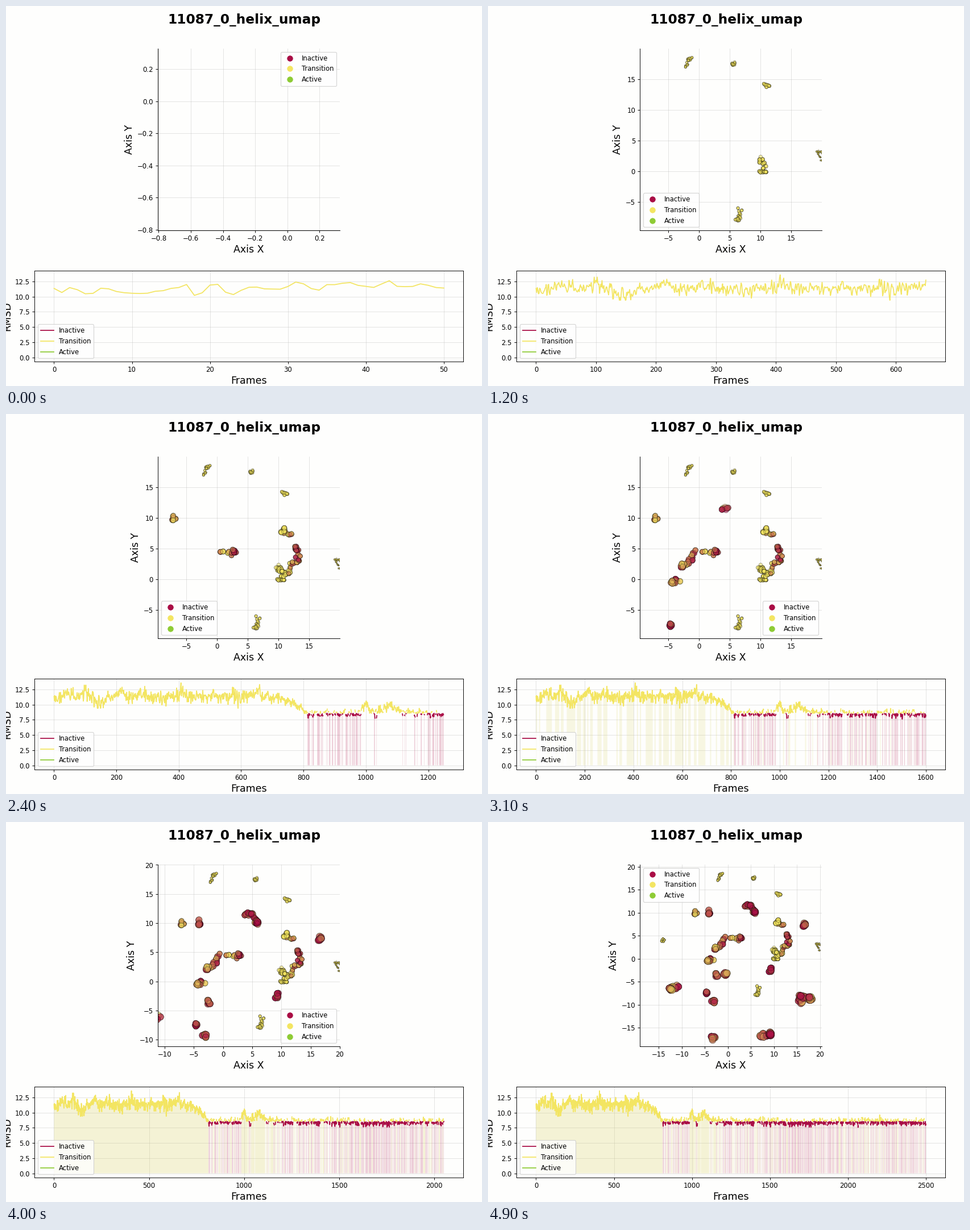
A matplotlib script for the animation above (5 s loop, 837x669 px).

```python
import numpy as np
import matplotlib.pyplot as plt
from matplotlib.animation import FuncAnimation
from matplotlib.lines import Line2D

DPI = 83.7
WIDTH, HEIGHT = 837, 669
STEP, FRAMES = 50, 50
TOTAL = STEP * FRAMES + 1
BACKGROUND = "#fefefd"
SHADE = "#d8d060"
STATES = {"Inactive": "#a90d45", "Transition": "#f3e562", "Active": "#8ecb35"}
rng = np.random.default_rng(11087)
index = np.arange(TOTAL)

# Stops of the walk through the projection, all with the same dwell time.
STOPS = [
    (20.1, 1.9), (19.4, 3.1), (-14.2, 3.9), (-1.9, 17.2), (-1.6, 18.2), (5.6, 17.4),
    (6.8, -6), (6.3, -7.8), (11.1, 13.9), (9.9, 0.1), (10.8, -0.1), (10.4, 1.4),
    (9.8, 2), (10.7, 1.1), (11.6, 0.9), (12.1, 2.6), (13.1, 2.9), (12.7, 5),
    (12.2, 7.2), (10.6, 7.9), (-7.2, 9.8), (0.9, 4.4), (2.7, 4.5), (-0.7, 4.7),
    (-1.4, 3.2), (-2.7, 2.2), (-3.3, 0), (-4.3, -0.4), (-4.6, -7.5), (3.7, 11.3),
    (4.8, 11.8), (5.9, 10), (9.3, -2.6), (-2.5, -3.6), (-4, 10), (-3, -9.2),
    (16.4, 7.4), (-10.9, -6), (-12.5, -6.6), (-3.2, -17.2), (-0.6, -3.4), (15.6, -9.6),
    (15.8, -8.1), (17.8, -8.6), (7.1, -16.8), (9.2, -16.5)]


def bump(center, width):
    return np.exp(-((index - center) / width) ** 2)


def make_rmsd():
    trend = np.interp(index, [0, 660, 760, 815, TOTAL], [11.1, 11.4, 10.5, 8.5, 8.5])
    trend += sum(bump(center, 12) for center in (40, 100, 210, 275, 410, 655))
    trend += 1.6 * bump(1000, 14) + 1.1 * bump(1080, 40) - 0.8 * bump(145, 18)
    trend -= 0.2 * bump(1720, 120)
    spread = np.where(index < 780, 0.55, 0.3) + 0.2 * bump(1050, 60)
    white = rng.normal(size=TOTAL)
    values = trend + spread * (0.85 * white + 0.5 * np.roll(white, 1))
    return np.clip(values, np.where(index < 780, 9.4, 7.2), 13.6)


def make_projection(spots_per_stop=8):
    """Clumps on the way to the next stop if it is close, else around this one."""
    stops = np.array(STOPS)
    ahead = np.diff(stops, axis=0, append=stops[-1:])
    ahead[np.hypot(*ahead.T) > 2.2] = 0
    t = np.linspace(0, 1, spots_per_stop)[:, None]
    spots = stops[:, None] + t * ahead[:, None]
    spots += rng.normal(0, 0.2, spots.shape)
    stop = index * len(stops) // TOTAL
    spot = rng.integers(spots_per_stop, size=TOTAL)
    return spots[stop, spot] + rng.normal(0, 0.03, (TOTAL, 2))


rmsd = make_rmsd()
points = make_projection()
inactive = (rmsd < 8.57) & (index > 810)
colors = np.where(inactive, STATES["Inactive"], STATES["Transition"])
sizes = 1.5 + 0.047 * index
streaks = np.repeat(rng.random(TOTAL // 6 + 1) < 0.5, 6)[:TOTAL]


def add_axes(left, top, right, bottom):
    ax = fig.add_axes([left / WIDTH, 1 - bottom / HEIGHT,
                       (right - left) / WIDTH, (bottom - top) / HEIGHT])
    ax.set_facecolor(BACKGROUND)
    ax.grid(alpha=0.35)
    ax.set_axisbelow(True)
    return ax


def view_limits(k):
    if k == 0:
        return -0.804, 0.327
    if k < 38:
        return -9.6, 19.98
    if k < 42:
        return -11.16, 20.03
    return -19.1, 20.43


def legend_corner(k):
    if k < 8:
        return "upper right"
    if k < 29:
        return "lower left"
    return "lower right" if k < 42 else "upper left"


plt.rcParams["font.family"] = "DejaVu Sans"
fig = plt.figure(figsize=((WIDTH + 0.01) / DPI, (HEIGHT + 0.01) / DPI), dpi=DPI,
                 facecolor=BACKGROUND)
fig.suptitle("11087_0_helix_umap", fontsize=20, fontweight="bold")

map_ax = add_axes(267.2, 75.2, 587.2, 395.2)
map_ax.spines[["top", "right"]].set_visible(False)
map_ax.set_xlabel("Axis X", fontsize=15, labelpad=3)
map_ax.set_ylabel("Axis Y", fontsize=15)
cloud = map_ax.scatter([], [], alpha=0.3, edgecolors="k", linewidths=0.5)
handles = [Line2D([], [], color="w", marker="o", markersize=10, markerfacecolor=color,
                  label=name) for name, color in STATES.items()]
map_legend = map_ax.legend(handles=handles, loc="upper right")

rmsd_ax = add_axes(50.2, 466, 804.2, 626.2)
rmsd_ax.set_xlabel("Frames", fontsize=15, labelpad=3)
rmsd_ax.set_ylabel("RMSD", fontsize=15)
rmsd_ax.set_ylim(-0.72, 14.28)
lines = {name: rmsd_ax.plot([], [], color=color, label=name)[0]
         for name, color in STATES.items()}
rmsd_ax.legend(loc="lower left")
fills = []


def shade(count, where, color, alpha):
    fills.append(rmsd_ax.fill_between(index[:count], rmsd[:count], where=where[:count],
                                      color=color, alpha=alpha, linewidth=0))


def update(k):
    count = STEP * (k + 1) + 1
    x, y, low = index[:count], rmsd[:count], inactive[:count]

    cloud.set_offsets(points[:count])
    cloud.set_sizes(sizes[:count])
    cloud.set_facecolor(colors[:count])
    map_ax.set_xlim(view_limits(k))
    map_ax.set_ylim(view_limits(k))
    map_legend.set_loc(legend_corner(k))

    lines["Inactive"].set_data(x, np.where(low, y, np.nan))
    lines["Transition"].set_data(x, np.where(low, np.nan, y))
    last = count - 1
    rmsd_ax.set_xlim(-0.05 * last, 1.05 * last)

    while fills:
        fills.pop().remove()
    shade(count, inactive, STATES["Inactive"], 0.2)
    # The pale transition shading comes in as streaks before it is solid.
    if k >= 36:
        shade(count, ~inactive, SHADE, 0.25)
    elif k >= 27:
        shade(count, ~inactive & streaks, SHADE, 0.17)
    return []


animation = FuncAnimation(fig, update, frames=FRAMES, interval=100, repeat=True,
                          repeat_delay=0, init_func=lambda: [], blit=False)
plt.show()
```
